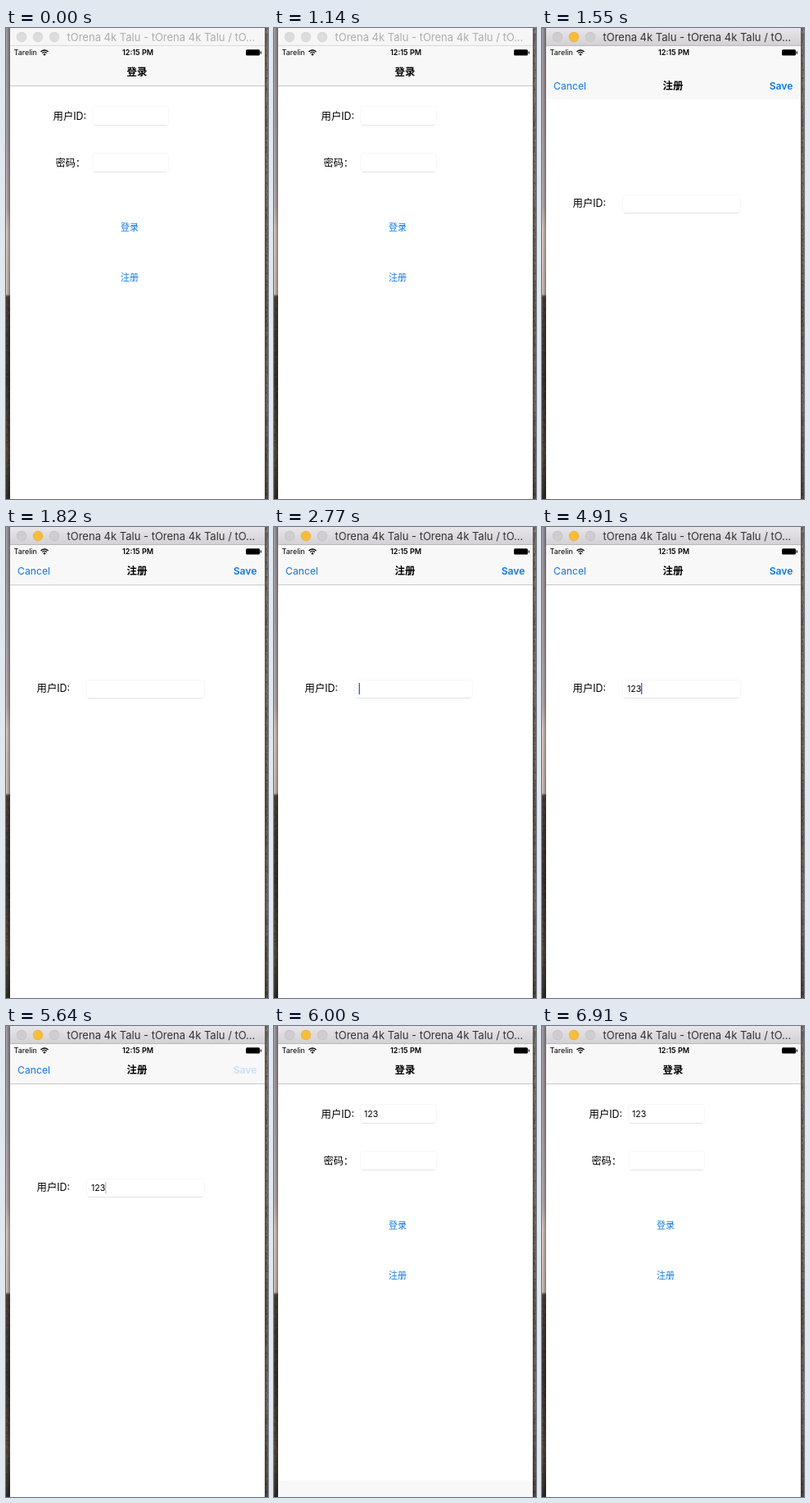
An HTML page with a canvas for the animation above (6960 ms loop, 320 by 574 pixels).

```html
<!DOCTYPE html>
<html lang="zh">
<head>
<meta charset="utf-8">
<style>
  html, body { margin: 0; width: 320px; height: 574px; overflow: hidden; }
  canvas { display: block; }
</style>
</head>
<body>
<canvas id="stage" width="320" height="574"></canvas>
<script>
const c = document.getElementById('stage').getContext('2d');
const LOOP = 6960;
const ACTIVATE = 1200, PRESENT = 1260, FOCUS = 2600;
const KEYS = [3500, 3720, 3900];
const SAVE_DOWN = 5560, DISMISS = 5720;
const TRAVEL = 552, BLUE = '#1277de';
const DEVICE = 'tOrena 4k Talu';

function text(s, x, y, size, { weight = 400, color = '#000', align = 'left' } = {}) {
  c.font = `${weight} ${size}px Inter, "Noto Sans CJK SC", "Noto Sans CJK", sans-serif`;
  c.textAlign = align;
  c.fillStyle = color;
  c.fillText(s, x, y);
}

function rect(x, y, w, h, color) {
  c.fillStyle = color;
  c.fillRect(x, y, w, h);
}

function disc(x, y, r, color) {
  c.fillStyle = color;
  c.beginPath();
  c.arc(x, y, r, 0, 7);
  c.fill();
}

function gradient(x0, y0, x1, y1, ...stops) {
  const g = c.createLinearGradient(x0, y0, x1, y1);
  stops.forEach(([at, color]) => g.addColorStop(at, color));
  return g;
}
const down = (h, ...stops) => gradient(0, 0, 0, h, ...stops);

// Fraction of the way still to go, for a critically damped spring
function remaining(ms) {
  const k = Math.max(0, ms) * 0.01826;
  return (1 + k) * Math.exp(-k);
}

const clamp = v => Math.min(1, Math.max(0, v));

function wallpaper() {
  rect(0, 0, 6, 574, down(574, [0, '#a9a2ac'], [.2, '#b3a9ae'], [.38, '#c4b6b5'],
    [.43, '#e2d2cb'], [.565, '#d8c8c1'], [.57, '#5a4e45'], [.75, '#453d36'], [.9, '#65584c'], [1, '#36372f']));
  rect(315, 0, 5, 574, down(574, [0, '#aaa39c'], [.05, '#9b8b7a'], [.3, '#9d8c79'],
    [.6, '#837361'], [.8, '#928374'], [1, '#665a4d']));
  for (let y = 0; y < 574; y += 2) {
    for (const x of [0, 2, 317, 319]) {
      const n = Math.abs(Math.sin(x * 78.23 + y * 12.99) * 437.58) % 1;
      if (x > 9 || y > 327) rect(x, y, 2, 2, `rgba(30,24,18,${n * .35})`);
    }
  }
  // Window shadow
  rect(0, 0, 5, 574, gradient(0, 0, 5, 0, [0, '#0000'], [1, '#0006']));
  rect(316, 0, 4, 574, gradient(316, 0, 320, 0, [0, '#0006'], [1, '#0001']));
}

function titleBar(active) {
  rect(5, 0, 311, 22, active ? down(22, [0, '#e8e6ea'], [1, '#d2d0d4']) : '#f6f6f6');
  rect(5, 21, 311, 1, active ? '#bab8bb' : '#dadada');
  for (const x of [19, 39, 59]) {
    const lit = active && x === 39;
    disc(x, 11, 6.2, lit ? '#e6b03f' : active ? '#c2c0c3' : '#d4d4d4');
    disc(x, 11, 5.6, lit ? '#f6bd3b' : active ? '#cfcdd0' : '#dcdcdc');
  }
  text(`${DEVICE} - ${DEVICE} / tO...`, 74.5, 16, 13, { color: active ? '#333' : '#adadad' });
}

function statusBar() {
  text('Tarelin', 9.5, 33, 9);
  c.strokeStyle = '#000';
  c.lineWidth = 1.3;
  for (const r of [3.6, 6]) {
    c.beginPath();
    c.arc(47, 33, r, -Math.PI * .77, -Math.PI * .23);
    c.stroke();
  }
  disc(47, 32.2, 1.2, '#000');
  text('12:15 PM', 161, 33, 9, { weight: 600, align: 'center' });
  c.fillStyle = '#000';
  c.beginPath();
  c.roundRect(293, 26.2, 17, 7.3, 1.5);
  c.fill();
  rect(310.7, 28.5, 1.2, 3, '#000');
}

function page(title, lineAlpha = 1) {
  rect(5, 22, 311, 574, '#fff');
  rect(5, 22, 311, 48, '#f8f8f8');
  rect(5, 70, 311, 1, `rgba(200,200,202,${lineAlpha})`);
  text(title, 160, 58, 12.4, { weight: 700, align: 'center' });
}

function field(x, y, w, h) {
  c.strokeStyle = '#f6f6f6';
  c.lineWidth = 1;
  c.beginPath();
  c.roundRect(x + .5, y + .5, w - 1, h - 1, 3);
  c.stroke();
  rect(x + 3, y + h - 1, w - 6, 1, '#e3e3e3');
}

function login(userId) {
  page('登录');
  text('用户ID:', 57.5, 111.5, 12.4);
  field(105, 95, 94, 24);
  text(userId, 110, 111, 10.6);
  text('密码：', 60.5, 168.5, 12.2);
  field(105, 152, 94, 24);
  text('登录', 151, 246.5, 11, { color: BLUE, align: 'center' });
  text('注册', 151, 307.5, 11, { color: BLUE, align: 'center' });
}

function register(t, dy) {
  c.save();
  c.translate(0, dy);
  page('注册', clamp(1 - dy / 17));
  text('Cancel', 14, 58, 12.2, { color: BLUE });
  const pressed = t >= SAVE_DOWN && t < DISMISS;
  text('Save', 306.5, 58, 12.2, { weight: 600, color: pressed ? '#cbdff4' : BLUE, align: 'right' });
  text('用户ID:', 37.5, 201, 12.4);
  field(98, 186, 145, 23);

  const typed = KEYS.filter(k => t >= k).length;
  const value = '123'.slice(0, typed);
  text(value, 104, 201, 10.6);
  if (t >= FOCUS && t < DISMISS) {
    const since = t - (typed ? KEYS[typed - 1] : FOCUS);
    c.globalAlpha = clamp(.5 + 2 * Math.cos(since * Math.PI / 500));
    rect(103.6 + c.measureText(value).width, 190, 1.4, 14, '#3a66c8');
  }
  c.restore();
}

function draw(now) {
  const t = now % LOOP;
  wallpaper();
  login(t >= DISMISS ? '123' : '');
  if (t >= PRESENT) {
    const dy = t < DISMISS
      ? TRAVEL * remaining(t - PRESENT)
      : TRAVEL * (1 - remaining(t - DISMISS));
    if (dy < TRAVEL - .5) register(t, dy);
  }
  statusBar();
  titleBar(t >= ACTIVATE);
  requestAnimationFrame(draw);
}
requestAnimationFrame(draw);
</script>
</body>
</html>
```
